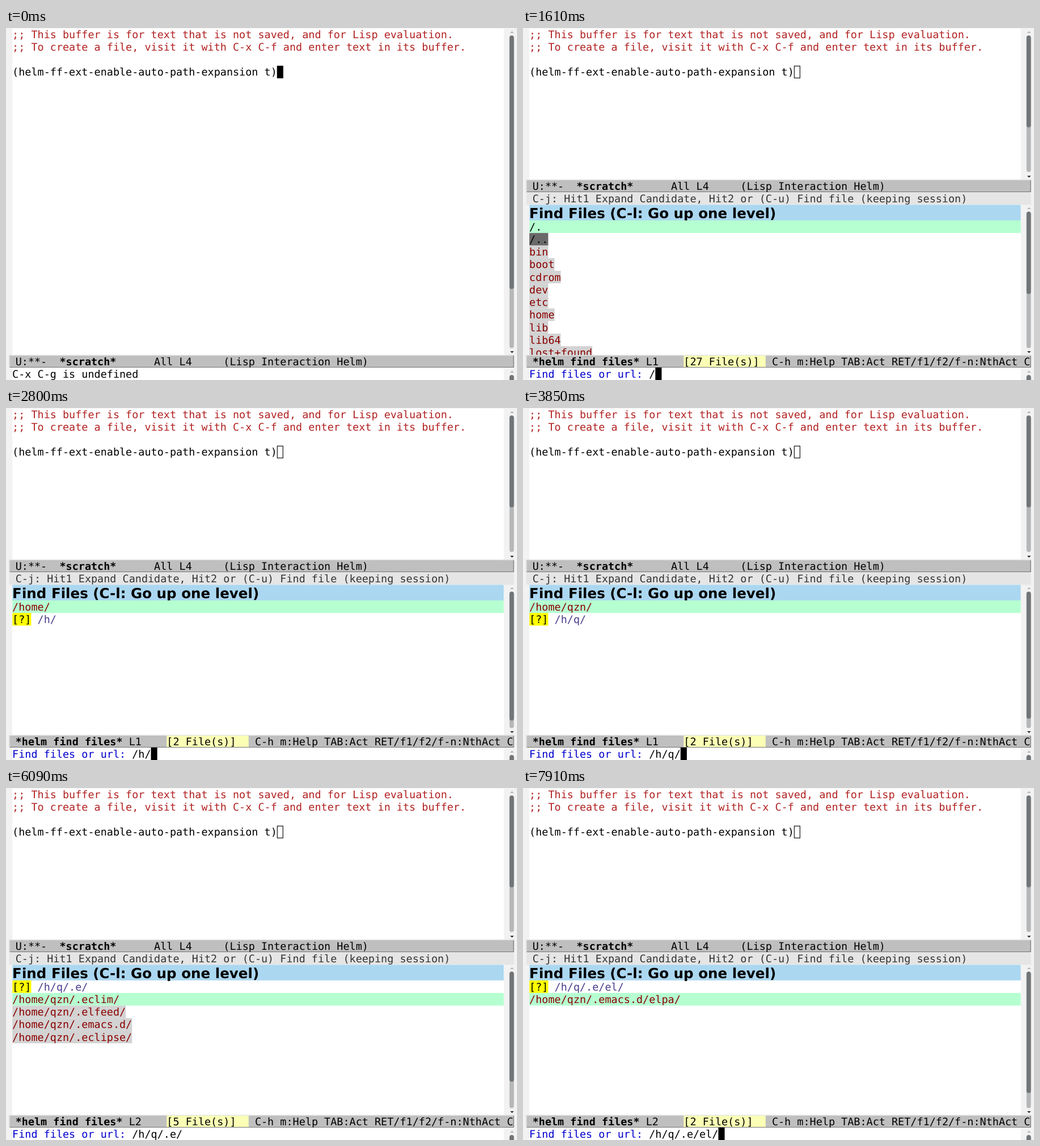
Animation, 901 px wide and 622 px high, one loop 8 s. Source, as an HTML page:

```html
<!DOCTYPE html>
<html lang="en">
<head>
<meta charset="utf-8">
<title>Path expansion in a file finder</title>
<style>
  html, body { margin: 0; width: 100%; height: 100%; overflow: hidden; background: #f2f2f2; }
  /* Laid out on a grid of 10 by 20 cells, shown at 10/9 of its size */
  #stage {
    position: absolute; width: 811px; height: 560px; overflow: hidden;
    transform: scale(1.11111); transform-origin: 0 0;
    font: 16.61px/21px "DejaVu Sans Mono", monospace;
    text-rendering: geometricPrecision; white-space: pre; color: #000;
  }
  #stage div, #stage i { position: absolute; }
  #stage span { display: inline-block; height: 20px; vertical-align: top; }
  #paper { left: 10px; top: 1px; width: 780px; height: 559px; background: #fff; }
  .line { left: 10px; height: 20px; }
  .note { color: #b22222; }
  .mode, #hint { left: 5px; width: 801px; height: 20px; overflow: hidden; }
  .mode { background: #bfbfbf; box-shadow: inset 1px 1px #e5e5e5, inset -1px -1px #737373; }
  #hint { top: 261px; background: #e5e5e5; color: #333; }
  #pane { left: 10px; top: 281px; width: 780px; height: 239px; overflow: hidden; background: #fff; }
  #title {
    left: 0; top: 0; width: 780px; height: 25px; background: #abd7f0;
    font: bold 22.1px/28px "DejaVu Sans", sans-serif;
  }
  .row { left: 0; width: 780px; height: 20px; }
  .dir { color: #8b0000; background: #d3d3d3; }
  .dots { background: #696969; }
  .file { color: #483d8b; }
  .new { background: #ff0; }
  .sel { background: #b5ffd1; }
  .sel span { background: none; }
  .count { background: #faffb5; box-shadow: inset 0 1px #e5e5e5, inset 0 -1px #737373; }
  .prompt { color: #0000cd; }
  .cursor { width: 10px; height: 20px; background: #000; box-sizing: border-box; }
  .hollow { background: none; border: 1px solid #000; }
  .track, .thumb { left: 799px; width: 7px; border-radius: 3.5px; }
  .track { background: #b6b7b8; }
  .thumb { background: #727577; }
  .up, .down { left: 799.5px; border: solid transparent; border-width: 0 3px; }
  .up { border-bottom: 3.5px solid #b4b4b4; }
  .down { border-top: 3.5px solid #333; }
</style>
</head>
<body>
<div id="stage"></div>
<script>
const LOOP = 8000, ROW = 20;
const HOME = '/home/qzn/';
const stage = document.getElementById('stage');

function add(parent, tag, cls, text = '', css = {}) {
  const el = document.createElement(tag);
  el.className = cls;
  el.textContent = text;
  Object.assign(el.style, css);
  parent.append(el);
  return el;
}
const box = (id, text) => {
  const el = add(stage, 'div', '', text);
  el.id = id;
  return el;
};
const px = n => n + 'px';
const column = n => px(10 + 10 * n);

function scrollbar(top) {
  add(stage, 'i', 'up', '', { top: px(top - 7) });
  const track = add(stage, 'i', 'track', '', { top: px(top) });
  const thumb = add(stage, 'i', 'thumb', '', { top: px(top) });
  const arrow = add(stage, 'i', 'down');
  return (end, thumbEnd) => {
    track.style.height = px(end - top);
    thumb.style.height = px(thumbEnd - top);
    arrow.style.top = px(end + 5.5);
  };
}

// Fixed parts
box('paper', '');
[';; This buffer is for text that is not saved, and for Lisp evaluation.',
 ';; To create a file, visit it with C-x C-f and enter text in its buffer.', '',
 '(helm-ff-ext-enable-auto-path-expansion t)'
].forEach((text, i) =>
  add(stage, 'div', i < 2 ? 'line note' : 'line', text, { top: px(i * ROW) }));
const point = add(stage, 'div', 'cursor', '', { left: column(42), top: px(3 * ROW) });

const scratchMode = add(stage, 'div', 'mode');
scratchMode.append(' U:**-  ');
add(scratchMode, 'b', '', '*scratch*');
scratchMode.append('      All L4     (Lisp Interaction Helm)');
const scratchBar = scrollbar(12);

const hint = box('hint', ' C-j: Hit1 Expand Candidate, Hit2 or (C-u) Find file (keeping session)');
const pane = box('pane', '');
const helmMode = add(stage, 'div', 'mode', '', { top: '520px' });
const paneParts = [hint, pane, helmMode];
const before = stage.children.length;
const helmBar = scrollbar(292);
paneParts.push(...[...stage.children].slice(before));

const echo = add(stage, 'div', 'line', '', { top: '540px' });
const caret = add(stage, 'div', 'cursor', '', { top: '540px' });
scrollbar(552)(600, 590);

// Candidate lists
const kind = cls => (...names) => names.map(name => [cls, name]);
const dir = kind('dir'), dots = kind('dots'), file = kind('file'), fresh = kind('new');
const inHome = names => names.split(' ').map(n => HOME + n + '/');
const view = (rows, sel, count, thumb) => ({ rows, sel, count, thumb });

const eDirs = dir(...inHome('.eclim .elfeed .emacs.d .eclipse'));
const elpa = dir(HOME + '.emacs.d/elpa/');
const views = {
  home: view([...dots(HOME + '.', HOME + '..'),
    ...dir('.AndroidStudio1.2', '.AndroidStudio1.3', '.AndroidStudio1.5', '.AndroidStudio2.2',
      '.QtWebEngineProcess', '.Skype'),
    ...file('.Xauthority'), ...dir('.adobe', '.akregator')], 0, 159, 333),
  root: view([...dots('/.', '/..'),
    ...dir(...'bin boot cdrom dev etc home lib lib64 lost+found'.split(' '))], 0, 27, 423),
  h: view([...fresh('h'), ...dir('home')], 1, 2, 498),
  hDir: view([...dir('/home/'), ...fresh('/h/')], 0, 2, 497),
  q: view([...dir(HOME), ...fresh('/h/q')], 0, 2, 495),
  qDir: view([...dir(HOME), ...fresh('/h/q/')], 0, 2, 494),
  dot: view([...dots(HOME + './', '/h/q/.', HOME + '../'),
    ...dir(...inHome('.mu .m2 .yEd .vim .ssh .sbt .rvm .pki'))], 0, 143, 316),
  e: view([...fresh('/h/q/.e'), ...eDirs, ...file(HOME + '.esd_auth')], 1, 6, 460),
  eDir: view([...fresh('/h/q/.e/'), ...eDirs], 1, 5, 467),
  ee: view([...elpa, ...fresh('/h/q/.e/e'), ...dir(HOME + '.emacs.d/eshell/')], 0, 3, 477),
  el: view([...fresh('/h/q/.e/el'), ...elpa], 1, 2, 485),
  elDir: view([...fresh('/h/q/.e/el/'), ...elpa], 1, 2, 485)
};

// Start time, typed path, list, cursor shown
const steps = [
  [0, 'C-x C-g is undefined', null, true],
  [490, '', null, false],
  [980, HOME, 'home', true],
  [1470, HOME, 'home', false],
  [1610, '/', 'root', true],
  [2100, '/', 'root', false],
  [2240, '/h', 'h', true],
  [2800, '/h/', 'hDir', true],
  [3290, '/h/', 'hDir', false],
  [3360, '/h/q', 'q', true],
  [3850, '/h/q/', 'qDir', true],
  [4340, '/h/q/', 'qDir', false],
  [4550, '/h/q/.', 'qDir', true],
  [4620, '/h/q/.', 'dot', true],
  [5040, '/h/q/.', 'dot', false],
  [5110, '/h/q/.e', 'e', true],
  [5530, '/h/q/.e/', 'e', true],
  [5600, '/h/q/.e/', 'eDir', true],
  [6090, '/h/q/.e/', 'eDir', false],
  [6580, '/h/q/.e/', 'eDir', true],
  [6860, '/h/q/.e/e', 'eDir', true],
  [6930, '/h/q/.e/e', 'ee', true],
  [7280, '/h/q/.e/el', 'el', true],
  [7840, '/h/q/.e/el/', 'el', true],
  [7910, '/h/q/.e/el/', 'elDir', true]
];

function drawList({ rows, sel, count, thumb }) {
  pane.textContent = '';
  add(pane, 'div', '', 'Find Files (C-l: Go up one level)').id = 'title';
  rows.forEach(([cls, name], i) => {
    const row = add(pane, 'div', i === sel ? 'row sel' : 'row', '', { top: px(25 + i * ROW) });
    if (cls === 'new') {
      add(row, 'span', 'new', '[?]');
      add(row, 'span', 'file', ' ' + name);
    } else {
      add(row, 'span', cls, name);
    }
  });
  helmMode.textContent = ' ';
  add(helmMode, 'b', '', '*helm find files*');
  helmMode.append(` L${sel + 1}    `);
  add(helmMode, 'span', 'count', `[${count} File(s)]`.padEnd(13));
  helmMode.append(' C-h m:Help TAB:Act RET/f1/f2/f-n:NthAct C');
  helmBar(508.5, thumb);
}

function draw([, typed, name, shown]) {
  const open = name !== null;
  for (const el of paneParts) el.style.display = open ? '' : 'none';
  scratchMode.style.top = px(open ? 241 : 520);
  scratchBar(open ? 229 : 508.5, open ? 157.5 : 415);
  point.classList.toggle('hollow', open);
  point.style.display = open || shown ? '' : 'none';
  caret.style.display = open && shown ? '' : 'none';
  echo.textContent = '';
  if (open) {
    const prompt = 'Find files or url: ';
    add(echo, 'span', 'prompt', prompt);
    caret.style.left = column(prompt.length + typed.length);
    drawList(views[name]);
  }
  echo.append(typed);
}

let current;
const start = performance.now();
function tick() {
  const t = (performance.now() - start) % LOOP;
  const step = steps.findLast(s => s[0] <= t);
  if (step !== current) draw(current = step);
  requestAnimationFrame(tick);
}
tick();
</script>
</body>
</html>
```
